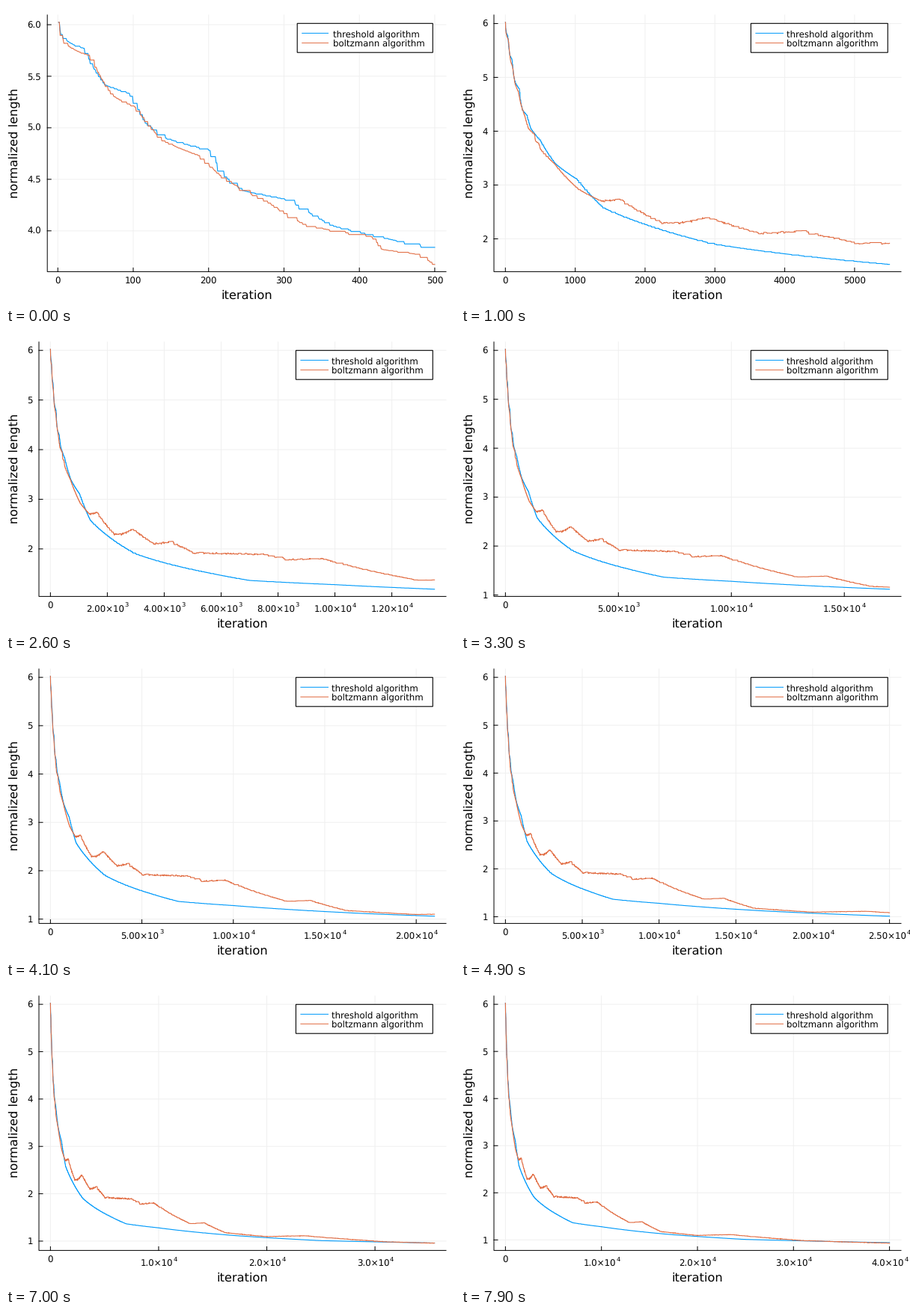
A matplotlib script for the animation above (8 s loop, 600 by 400 pixels).

```python
import math

import matplotlib.pyplot as plt
import numpy as np
from matplotlib.animation import FuncAnimation
from matplotlib.patches import Rectangle

W, H, DPI = 600, 400, 100
FRAMES, STRIDE = 80, 500
TOTAL = FRAMES * STRIDE
PX = 72 / DPI
RIGHT, TOP = 588, 12
SMALL, LARGE, SUPER = 8.5, 11.7, 6.0
BLUE, ORANGE, GRID = "#009afa", "#e26f46", "#f0f0f0"

plt.rcParams.update({"font.family": "DejaVu Sans", "text.hinting": "none",
                     "path.snap": False})

# Key points (iteration, length) of the two searches
THRESHOLD = [
    (1, 6.024), (35, 5.77), (62, 5.42), (96, 5.33), (116, 5.05), (143, 4.9),
    (202, 4.78), (218, 4.55), (246, 4.39), (307, 4.3), (364, 4.05),
    (500, 3.83), (714, 3.4), (1024, 3.11), (1400, 2.58), (2000, 2.27),
    (3000, 1.9), (5500, 1.525), (7000, 1.365), (10000, 1.28),
    (17000, 1.118), (25000, 1.011), (40000, 0.942),
]
BOLTZMANN = [
    (1, 6.024), (43, 5.7), (73, 5.31), (103, 5.2), (138, 4.88), (187, 4.73),
    (222, 4.5), (278, 4.28), (330, 4.05), (418, 3.94), (430, 3.82),
    (480, 3.77), (500, 3.672), (700, 3.4), (1050, 2.92), (1378, 2.7),
    (1640, 2.735), (2235, 2.3), (2550, 2.3), (2900, 2.4), (3650, 2.1),
    (4270, 2.148), (5020, 1.917), (7500, 1.89), (8400, 1.78), (9500, 1.81),
    (11400, 1.54), (12940, 1.367), (14200, 1.385), (16120, 1.18),
    (20000, 1.095), (23500, 1.113), (31000, 0.985), (40000, 0.932),
]
ITER = np.arange(1, TOTAL + 1)


def staircase(keys, seed, jitter=0.0):
    """Hold the key-point curve between random jumps, with optional wobble."""
    rng = np.random.default_rng(seed)
    jumps = [1.0]
    while jumps[-1] < TOTAL:
        jumps.append(jumps[-1] + 1 + rng.exponential(1.5 + min(jumps[-1] / 150, 50)))
    jumps = np.array(jumps)
    middles = (jumps + np.append(jumps[1:], jumps[-1])) / 2
    xs, ys = np.array(keys).T
    levels = np.interp(np.log(middles), np.log(xs), ys)
    levels[0] = ys[0]
    wobbly = (jumps > 1350) * np.where(jumps > 10000, 0.25, 1)
    levels += jitter * wobbly * rng.standard_normal(len(jumps))
    return levels[np.searchsorted(jumps, ITER, side="right") - 1]


CURVES = [
    ("threshold algorithm", BLUE, staircase(THRESHOLD, 3)),
    ("boltzmann algorithm", ORANGE, staircase(BOLTZMANN, 8, 0.008)),
]


def widen(lo, hi):
    pad = 0.03 * (hi - lo)
    return lo - pad, hi + pad


def nice_ticks(lo, hi):
    """Score round steps by count, coverage and niceness; keep the best."""
    span = hi - lo
    power = math.floor(math.log10(span))
    best, ticks = -1, []
    for z in (power, power - 1):
        for q, nice in ((5, 0.9), (3, 0.2), (2.5, 0.5), (2, 0.7), (1, 1.0)):
            step = q * 10.0 ** z
            marks = [i * step for i in range(math.ceil(lo / step),
                                             math.floor(hi / step) + 1)]
            if not 4 <= len(marks) <= 8:
                continue
            score = ((1 - abs(len(marks) - 5) / 5) / 4 + nice / 4
                     + span / (marks[-1] - marks[0]) / 2)
            if score > best + 1e-9:
                best, ticks = score, marks
    return ticks


def decimals(values):
    return next(d for d in range(6)
                if all(abs(round(v, d) - v) < 1e-7 for v in values))


def line(xs, ys, color="black", width=1.0, **kw):
    ax.plot(xs, ys, color=color, lw=width * PX, **kw)


def label(x, y, text, size=SMALL, **kw):
    return ax.text(x, y, text, fontsize=size, va="baseline", **kw)


def x_labels(ticks, to_x, bottom, scientific):
    powers = [math.floor(math.log10(t) + 1e-9) if t else 0 for t in ticks]
    mantissas = [t / 10 ** p for t, p in zip(ticks, powers)]
    digits = decimals(mantissas) + 1
    for t, m, p in zip(ticks, mantissas, powers):
        if t == 0 or not scientific:
            label(to_x(t), bottom + 16.3, f"{t:.0f}", ha="center")
            continue
        base = label(to_x(t) - 2.7, bottom + 21.7, f"{m:.{digits}f}×10", ha="center")
        ax.annotate(str(p), (1, 0), xycoords=base, xytext=(0.4, 7.2),
                    textcoords="offset points", fontsize=SUPER, va="baseline")


def legend(x):
    ax.add_patch(Rectangle((x, 23.3), 570.3 - x, 38.9, fc="white", ec="black",
                           lw=1.1 * PX, zorder=4))
    for i, (name, color, _) in enumerate(CURVES):
        y = 36.4 + 13 * i
        line([x + 6.5, 430.5], [y, y], color, zorder=5)
        label(x + 47.6, y + 4.6, name, zorder=5)


def draw(frame):
    n = (frame + 1) * STRIDE
    ax.clear()
    ax.set(xlim=(0, W), ylim=(H, 0))
    ax.axis("off")

    data = [ys[:n] for _, _, ys in CURVES]
    x_lo, x_hi = widen(1, n)
    y_lo, y_hi = widen(min(d.min() for d in data), max(d.max() for d in data))
    x_ticks, y_ticks = nice_ticks(x_lo, x_hi), nice_ticks(y_lo, y_hi)
    y_digits = decimals(y_ticks)
    scientific = x_ticks[-1] - x_ticks[0] > 10000
    left = 55.2 if y_digits else 44.0
    bottom = 352.4 if scientific else 355.4

    def to_x(v):
        return left + (v - x_lo) / (x_hi - x_lo) * (RIGHT - left)

    def to_y(v):
        return bottom - (v - y_lo) / (y_hi - y_lo) * (bottom - TOP)

    for t in x_ticks:
        x = to_x(t)
        line([x, x], [TOP, bottom], GRID, zorder=1)
        line([x, x], [bottom, bottom - 5], zorder=3)
    for t in y_ticks:
        y = to_y(t)
        line([left, RIGHT], [y, y], GRID, zorder=1)
        line([left, left + 5], [y, y], zorder=3)
        label(left - 8.3, y + 4.4, f"{t:.{y_digits}f}", ha="right")
    line([left, left, RIGHT], [TOP, bottom, bottom], zorder=3)
    x_labels(x_ticks, to_x, bottom, scientific)

    for (_, color, _), ys in zip(CURVES, data):
        line(to_x(ITER[:n]), to_y(ys), color, 1.1, zorder=2)

    label((left + RIGHT) / 2, 393.3 if scientific else 392, "iteration", LARGE,
          ha="center")
    label(16, (TOP + bottom) / 2 - 0.5, "normalized length", LARGE, ha="center",
          rotation=90, rotation_mode="anchor")
    legend(389.2 if y_digits else 387.4)
    return []


fig = plt.figure(figsize=(W / DPI, H / DPI), dpi=DPI, facecolor="white")
ax = fig.add_axes([0, 0, 1, 1])
anim = FuncAnimation(fig, draw, frames=FRAMES, interval=100, repeat=True)
plt.show()
```
